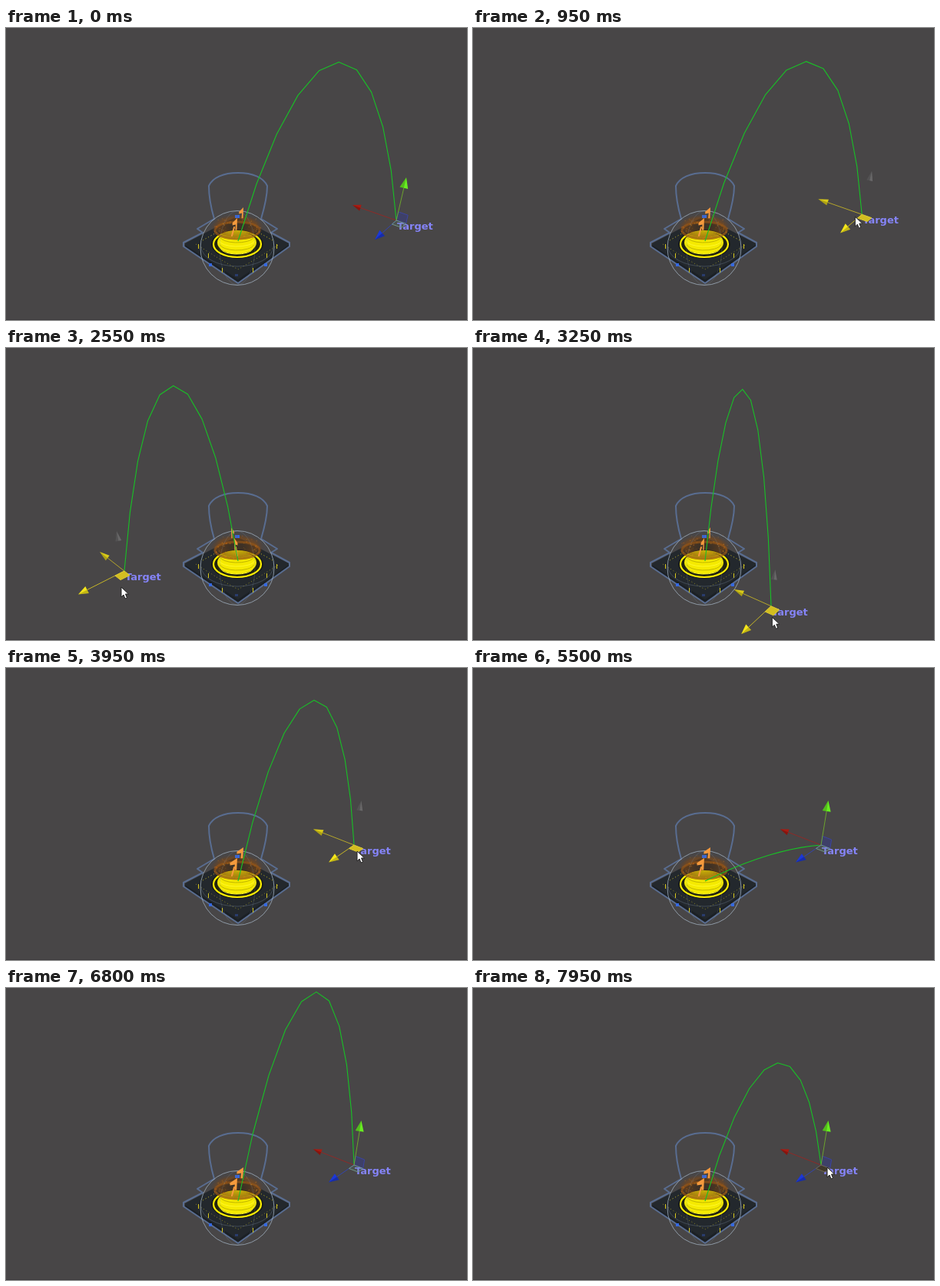
These frames come from a looping animation (600 px wide and 381 px high, 8000 ms). An HTML page with a canvas:

```html
<!DOCTYPE html>
<html lang="en">
<head>
<meta charset="utf-8">
<title>Launch arc</title>
<style>
html, body { margin: 0; width: 100%; height: 100%; overflow: hidden; background: #484647; }
canvas { display: block; }
</style>
</head>
<body>
<canvas id="stage" width="600" height="381"></canvas>
<script>
const ctx = document.getElementById('stage').getContext('2d');
const LOOP = 8000, STEP = 50;
const MUZZLE = { x: 302, y: 278 }, HORIZON = -4, MID_Y = 190;
const DRAG = [100, 4300], HOVER = 7700;

// time, x, y of the landing point
const landingKeys = [
  [0, 508, 251], [150, 508, 251], [420, 551, 305], [600, 522, 345], [850, 512, 255],
  [1250, 480, 222], [1550, 412, 211], [1700, 352, 205], [2000, 232, 216], [2300, 162, 256],
  [2550, 154, 291], [2750, 185, 330], [3000, 285, 345], [3400, 432, 326], [3600, 457, 268],
  [3750, 446, 208], [3950, 453, 231], [8000, 453, 231]
];
// time, arc height
const heightKeys = [
  [0, 204], [5100, 204], [5200, 211], [5430, 11], [5550, 9], [6450, 240], [6800, 233],
  [7000, 239], [7600, 158], [7950, 157]
];
// time, cursor offset from the landing point
const cursorKeys = [[0, 0, 5], [1250, -12, 2], [1550, -14, 1], [2550, -4, 21], [3950, 4, 8], [5000, 4, 8]];
const arrivalKeys = [[7300, 580, 296], [7700, 461, 234], [8000, 461, 234]];

const lerp = (a, b, u) => a + (b - a) * u;
const clamp = (v, lo, hi) => Math.max(lo, Math.min(hi, v));

function slope(keys, i, c) {
  if (i < 1 || i > keys.length - 2) return 0;
  const [p, k, n] = [keys[i - 1], keys[i], keys[i + 1]];
  const before = (k[c] - p[c]) / (k[0] - p[0]), after = (n[c] - k[c]) / (n[0] - k[0]);
  return before * after <= 0 ? 0 : 2 * before * after / (before + after);
}

// Monotone Hermite interpolation, so that holds stay still
function sample(keys, t, c) {
  let i = keys.findIndex(k => k[0] > t) - 1;
  if (i === -2) return keys[keys.length - 1][c];
  if (i < 0) i = 0;
  const a = keys[i], b = keys[i + 1], span = b[0] - a[0], u = clamp((t - a[0]) / span, 0, 1);
  const u2 = u * u, u3 = u2 * u;
  return a[c] * (2 * u3 - 3 * u2 + 1) + b[c] * (3 * u2 - 2 * u3) +
    span * (slope(keys, i, c) * (u3 - 2 * u2 + u) + slope(keys, i + 1, c) * (u3 - u2));
}

const point = (keys, t) => ({ x: sample(keys, t, 1), y: sample(keys, t, 2) });

function random(seed) {
  const v = Math.sin(seed * 127.1 + 11.7) * 43758.5453;
  return v - Math.floor(v);
}

function poly(points, fill, stroke, width = 1, close = true) {
  ctx.beginPath();
  points.forEach(([x, y]) => ctx.lineTo(x, y));
  if (close) ctx.closePath();
  paint(fill, stroke, width);
}

function paint(fill, stroke, width = 1) {
  if (fill) { ctx.fillStyle = fill; ctx.fill(); }
  if (stroke) { ctx.strokeStyle = stroke; ctx.lineWidth = width; ctx.stroke(); }
}

function oval(x, y, rx, ry, fill, stroke, width, from = 0, to = Math.PI * 2) {
  ctx.beginPath();
  ctx.ellipse(x, y, rx, ry, 0, from, to);
  paint(fill, stroke, width);
}

function drawBase() {
  const tile = new Path2D('M231 280L256 267L249 262L271 249C266 232 264 218 264 206' +
    'C269 195 283 189 302 189C321 189 335 195 340 206C340 218 337 232 332 249' +
    'L353 262L345 267L369 280V285L302 333L231 285Z');
  poly([[233, 281], [300, 246], [368, 281], [368, 285], [302, 331], [233, 285]], '#23282d');
  poly([[233, 283], [302, 328], [368, 283], [368, 286], [302, 332], [233, 286]], '#1b2025');
  ctx.lineJoin = 'round';
  ctx.strokeStyle = '#596d91';
  ctx.lineWidth = 2;
  ctx.stroke(tile);

  ctx.setLineDash([1, 3]);
  poly([[247, 282], [279, 302], [302, 315], [324, 302], [356, 282]], null, '#8f8927', 1, false);
  poly([[256, 277], [281, 263]], null, '#8f8927');
  poly([[347, 277], [322, 263]], null, '#8f8927');
  ctx.setLineDash([]);
  ctx.fillStyle = '#d8c81d';
  for (const [x, y] of [[281, 313], [321, 313], [250, 282], [352, 282], [263, 294], [339, 294]])
    ctx.fillRect(x, y, 1, 6);
}

function drawCore(t) {
  oval(301, 282, 34, 19, '#16191c');
  oval(301, 282, 31, 17, '#22230f', '#fff000', 2.2);
  oval(300.5, 280, 25.5, 15, '#f5ea00');
  for (let i = 0; i < 4; i++)
    oval(300.5, 272 + i * 5, 23 - Math.abs(i - 1), 8, null, i % 2 ? '#fff82c' : '#c2b700', 1, 0.1, Math.PI - 0.1);

  // Flickering ember haze around the muzzle
  const haze = ctx.createRadialGradient(0, 0, 8, 0, 0, 33);
  haze.addColorStop(0, 'rgba(112,66,24,.35)');
  haze.addColorStop(.65, 'rgba(126,72,22,.65)');
  haze.addColorStop(1, 'rgba(100,62,32,0)');
  ctx.save();
  ctx.translate(301, 260);
  ctx.scale(1.04, .52);
  oval(0, 0, 33, 33, haze);
  ctx.restore();
  oval(301, 264, 29, 11, null, 'rgba(152,86,22,.65)', 3);
  for (let i = 0; i < 75; i++) {
    const age = (t / 1000 + random(i)) % 1, angle = random(i + 90) * Math.PI * 2;
    const r = 19 + random(i + 190) * 13;
    ctx.fillStyle = `rgba(220,${105 + random(i + 50) * 45 | 0},24,${.55 * (1 - age)})`;
    ctx.fillRect(301 + Math.cos(angle) * r, 264 + Math.sin(angle) * 10 - age * 22 * random(i + 290), 1.3, 1.3);
  }
}

function drawSphere() {
  oval(301, 287, 48, 48.5, null, 'rgba(165,180,197,.75)', 1);
  oval(301, 285, 47, 26, null, 'rgba(120,138,160,.35)', 1, 0, Math.PI);
  oval(301, 287, 23, 48, null, 'rgba(130,145,165,.22)');
  ctx.fillStyle = '#3568e0';
  for (const [x, y] of [[264, 307], [336, 307], [300, 244]]) ctx.fillRect(x, y, 4, 4);
  ctx.fillStyle = '#293c6c';
  ctx.fillRect(298, 321, 4, 3);
}

function drawAim(landing) {
  const left = landing.x < 302;
  const width = clamp(1 - (landing.y - 211) / 80, .35, 1) * (left ? -1 : 1);
  const flag = (x, y, s) => poly([[0, 0], [-12, 6], [-12, 9], [-4, 8], [-5, 15], [-1, 15]]
    .map(([dx, dy]) => [x + dx * s * width, y + dy * s]), '#f59a3d');
  flag(left ? 293 : 309, 234, .95);
  flag(left ? 297 : 301, 248, 1.05);
  poly([[left ? 299 : 297, 260], [left ? 301 : 294, 271]], null, '#f59a3d', 2);
  ctx.fillStyle = '#3f67c9';
  ctx.fillRect(298, 244, 4, 4);
}

// A parabola seen in perspective; depth follows the ground row
function drawArc(landing, height) {
  const depth = 282 / (landing.y - HORIZON);
  const bend = 5 * clamp((302 - landing.x) / 148, 0, 1);
  const points = [];
  for (let i = 0; i <= 10; i++) {
    const u = i / 10, hump = 4 * u * (1 - u);
    const z = lerp(1, depth, u) - hump * height * .000905;
    const x = (landing.x - MUZZLE.x) * depth * u / z;
    const y = lerp(MUZZLE.y - MID_Y, (landing.y - MID_Y) * depth, u) - hump * height;
    points.push([MUZZLE.x + x + bend * hump, MID_Y + y / z]);
  }
  poly(points, null, '#18c126', 1.1, false);
}

function arm(c, [dx, dy], color, line, size = 5, head = 13) {
  const len = Math.hypot(dx, dy), ux = dx / len, uy = dy / len;
  const bx = c.x + dx - ux * head, by = c.y + dy - uy * head;
  if (line) poly([[c.x, c.y], [bx, by]], null, line, 1, false);
  poly([[c.x + dx, c.y + dy], [bx - uy * size, by + ux * size], [bx + uy * size, by - ux * size]], color);
  poly([[c.x + dx, c.y + dy], [bx, by], [bx + uy * size, by - ux * size]], 'rgba(0,0,0,.2)');
}

function quad(c, a, b, fill, stroke) {
  poly([[c.x, c.y], [c.x + a[0], c.y + a[1]], [c.x + a[0] + b[0], c.y + a[1] + b[1]],
    [c.x + b[0], c.y + b[1]]], fill, stroke);
}

function drawGizmo(c, dragging, hover) {
  const u = (c.x - 154) / 354;
  const red = [lerp(-32, -57, u), lerp(-25, -20, u)];
  const blue = [lerp(-60, -28, u), 20 + (c.y - 211) * .13];
  const green = [lerp(-10, 13, u), -60 + (c.y - 211) * .1];
  const scale = (v, k) => v.map(n => n * k);
  const back = scale(red, -.22), front = scale(blue, .2);

  if (dragging) {
    arm(c, green, '#686768', null, 4);
    arm(c, red, '#d9ca19', '#b5a62b', 4);
    arm(c, blue, '#f4e51b', '#c5b527', 5);
  } else {
    quad(c, back, scale(green, .2), 'rgba(45,55,165,.35)', '#3b44a2');
    arm(c, red, '#a91b12', '#8e2a27', 4, 11);
    arm(c, blue, '#1c38d7', '#3445ae', 5);
    arm(c, green, '#68ed22', '#6ca32e', 5.5, 14);
  }
  ctx.font = 'bold 13px "DejaVu Sans", sans-serif';
  ctx.fillStyle = '#8584f8';
  ctx.fillText('Target', c.x + 1, c.y + 12);
  if (dragging) quad(c, front, back, '#d3bd21', '#ddcb32');
  else quad(c, front, back, hover ? '#40382c' : 'rgba(90,130,115,.2)', hover ? '#6e6650' : '#70958b');
}

function drawCursor({ x, y }) {
  poly([[0, 0], [0, 13], [3, 10], [5, 15], [7.5, 14], [5.5, 9], [9.5, 9]]
    .map(([dx, dy]) => [x + dx, y + dy]), '#fff', '#222', 1);
}

function draw(t) {
  const landing = point(landingKeys, t);
  const dragging = t >= DRAG[0] && t < DRAG[1];
  ctx.fillStyle = '#484647';
  ctx.fillRect(0, 0, 600, 381);
  ctx.fillStyle = '#3d3b3d';
  ctx.fillRect(0, 380, 600, 1);
  drawBase();
  drawCore(t);
  drawSphere();
  drawAim(landing);
  drawArc(landing, sample(heightKeys, t, 1));
  drawGizmo(landing, dragging, t >= HOVER);
  if (dragging) {
    const offset = point(cursorKeys, t);
    drawCursor({ x: landing.x + offset.x, y: landing.y + offset.y });
  } else if (t >= arrivalKeys[0][0]) {
    drawCursor(point(arrivalKeys, t));
  }
}

const start = performance.now();
function tick(now) {
  const t = Math.max(0, now - start) % LOOP;
  draw(Math.floor(t / STEP) * STEP);
  requestAnimationFrame(tick);
}
draw(0);
requestAnimationFrame(tick);
</script>
</body>
</html>
```
